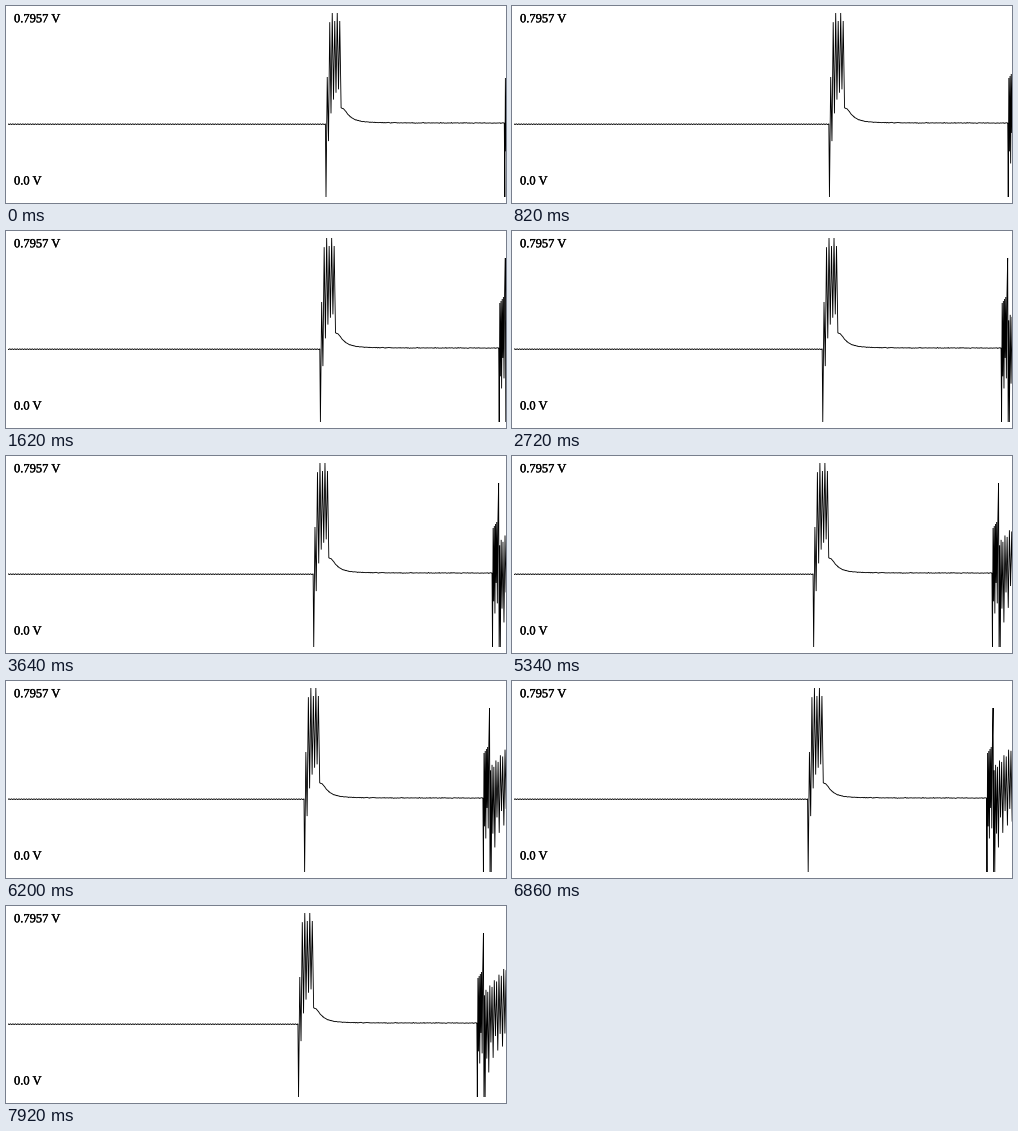
A matplotlib script that plays this animation: 500 by 197 pixels, repeating every 8000 ms.

```python
import numpy as np
import matplotlib.pyplot as plt
from matplotlib import patheffects
from matplotlib.animation import FuncAnimation
from matplotlib.patches import Rectangle

W, H, DPI = 500, 197, 100
TICK, LOOP = 20, 8000
PX = 72 / DPI                    # one pixel in points
FIRST, STEP = 35, 175            # redraw clock of the trace, ms
SPEED = 27.5 / 7920              # scroll in pixels per ms
BURST_A, BURST_B = 320, 498.8    # where the two bursts begin
FLOOR = 191                      # the signal clips here


def flat(start, end):
    x = np.arange(start, end, 0.6)
    return x, 118.2 + 0.4 * np.sin(2 * np.pi * x / 2.5)


def zigzag(x_low, low, x_top, top):
    """Alternate between low and top points, starting low."""
    x = np.column_stack([x_low, x_top]).ravel()
    y = np.column_stack([np.minimum(low, FLOOR), top]).ravel()
    return x, y


def first_burst():
    k = np.arange(6)
    sign = (-1.0) ** k
    x = BURST_A + 2.5 * k
    low = 80 + 111 * np.exp(-0.7 * k)
    top = 11 + 64 * np.exp(-4 * k) - 4 * sign
    return zigzag(x, low, x + 1.25, top)


def decay(start, end):
    rng = np.random.default_rng(4)
    x = np.arange(start, end, 0.6)
    y = 117 - 15 / (1 + ((x - start) / 8) ** 2.2)
    return x, y + rng.normal(0, 0.18, len(x))


def attack():
    k = np.arange(5)
    x = BURST_B + 1.2 * k
    low = 131 + 48 * np.exp(-0.6 * k) + 12 * (-1.0) ** k
    return zigzag(x, low, x + 0.6, 72 - 2 * k)


def ringing():
    """A kick upwards, then teeth that spread out as they die down."""
    k = np.arange(13)
    sign = (-1.0) ** k
    period = 2.4 - 1.2 * np.exp(-k / 2)
    u = 6.6 + np.cumsum(period) - period
    low = 132 + 75 * np.exp(-0.4 * k) - 16 * sign * np.exp(-0.1 * k)
    top = 88 - 1.2 * (u - 6) + 2 * sign
    x, y = zigzag(BURST_B + u, low, BURST_B + u + period / 2, top)
    return np.append(BURST_B + 6.1, x), np.append(27, y)


KNEE = BURST_A + 15.1
parts = [flat(-40, BURST_A), first_burst(), decay(KNEE, BURST_B),
         attack(), ringing()]
trace_x, trace_y = (np.concatenate(p) for p in zip(*parts))

fig = plt.figure(figsize=(W / DPI, H / DPI), dpi=DPI, facecolor="white")
ax = fig.add_axes([0, 0, 1, 1])
ax.set_xlim(0, W)
ax.set_ylim(H, 0)
ax.axis("off")

heavier = [patheffects.withStroke(linewidth=0.3 * PX, foreground="black")]
for y, label in ((16.3, "0.7957 V"), (178.5, "0.0 V")):
    ax.text(8, y, label, family="Liberation Serif", size=12.5 * PX,
            color="black", va="baseline", path_effects=heavier)

line, = ax.plot([], [], color="black", lw=0.88 * PX,
                solid_joinstyle="bevel", solid_capstyle="butt")
line.set_clip_path(Rectangle((2, 3), W - 2, FLOOR - 3, transform=ax.transData))


def draw(frame):
    ticks = (frame * TICK - FIRST) // STEP
    shown = max(0, FIRST + ticks * STEP)
    line.set_data(trace_x - SPEED * shown, trace_y)
    return line,


anim = FuncAnimation(fig, draw, frames=LOOP // TICK, interval=TICK,
                     init_func=lambda: draw(0), repeat=True, repeat_delay=0,
                     blit=False)
plt.show()
```
